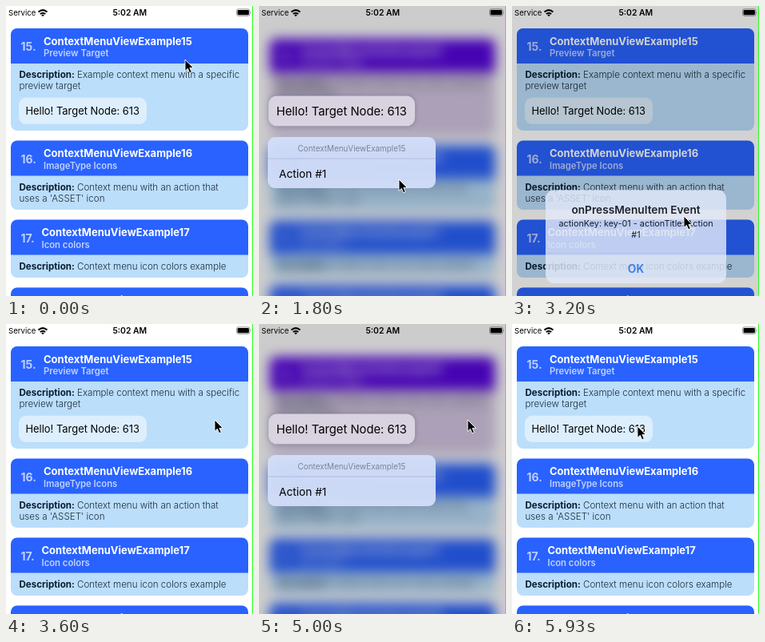
Animation, 309 px wide and 363 px high, one loop 6.07 s. Source, as an HTML page:

```html
<!DOCTYPE html>
<html lang="en">
<head>
<meta charset="utf-8">
<title>Context menu preview</title>
<style>
  html, body { margin: 0; width: 100%; height: 100%; overflow: hidden; background: #fff; }
  svg { display: block; width: 309px; height: 363px; font-family: Inter, "Open Sans", sans-serif; }
  #list { transform-origin: 154.5px 290px; }
  #shadow { filter: blur(3px); }
  .num { font-size: 14px; font-weight: 700; fill: #fff; opacity: .7; }
  .title { font-size: 13px; font-weight: 700; fill: #fff; }
  .sub { font-size: 11.3px; font-weight: 600; fill: #fff; opacity: .7; }
  .desc { font-size: 11.58px; font-weight: 300; fill: #1c2b3a; }
  .desc tspan { font-weight: 700; fill: #0b1d30; }
  .mid { text-anchor: middle; }
</style>
</head>
<body>
<svg viewBox="0 0 309 363">
  <g id="list"></g>
  <rect id="menuDim" width="309" height="363"/>

  <g id="menu">
    <rect x="-105" y="-32" width="210" height="64" rx="9" fill="#d3dff9" fill-opacity=".95"/>
    <path d="M-105-5H105" stroke="#8f9db8" stroke-opacity=".6" stroke-width=".7"/>
    <text class="mid" y="-14" font-size="9.9" fill="#7c8494">ContextMenuViewExample15</text>
    <text x="-91" y="19" font-size="13.7">Action #1</text>
  </g>

  <g id="preview">
    <rect id="shadow" x="-80" y="-16.5" width="160" height="33" rx="9" fill="#345"/>
    <rect id="label" x="-80" y="-16.5" width="160" height="33" rx="9"/>
    <text x="-71.5" y="4.7" font-size="12.92">Hello! Target Node: 613</text>
  </g>

  <text x="3" y="12" font-size="9.6">Service</text>
  <g fill="none" stroke="#000" stroke-width="2">
    <path d="M40.5 7.4q5.5-4.6 11 0M42.8 10q3.2-2.6 6.4 0"/>
    <path d="M46 13.2l-1.8-1.9q1.8-1.4 3.6 0z" fill="#000" stroke="none"/>
  </g>
  <text class="mid" x="154.8" y="12.3" font-size="10.4" font-weight="600">5:02 AM</text>
  <rect x="288.5" y="3.8" width="16.5" height="8.6" rx="2.4" fill="none" stroke="#000" stroke-opacity=".5" stroke-width=".8"/>
  <rect x="289.6" y="4.9" width="14.3" height="6.4" rx="1.4"/>
  <path d="M305.8 6.7q1.4 1.4 0 2.8z" opacity=".5"/>

  <rect id="alertDim" width="309" height="363"/>
  <g id="alert">
    <rect x="-113" y="-58.5" width="226" height="117" rx="11" fill="#e2eaf8" fill-opacity=".87"/>
    <path d="M-113 21H113" stroke="#8f9db8" stroke-opacity=".3" stroke-width=".7"/>
    <g class="mid" fill="#15181f">
      <text y="-29" font-size="13.7" font-weight="600">onPressMenuItem Event</text>
      <text y="-12.5" font-size="10.85">actionKey: key-01 - actionTitle: Action</text>
      <text y="1" font-size="10.85">#1</text>
      <text y="45" font-size="13.8" font-weight="600" fill="#2f78ee">OK</text>
    </g>
  </g>

  <rect x="308" width="1" height="363" fill="#2cff1e"/>
  <path id="cursor" d="M0 0V15.5L3.6 12.2L6.1 18L8.9 16.8L6.4 11.2H11.2Z" stroke="#fff"/>
</svg>

<script>
const $ = id => document.getElementById(id);
const LOOP = 6070, STEP = 100;

const cards = [
  { n: 15, y: 28, h: 128, x: 47, sub: "Preview Target",
    desc: ["Example context menu with a specific", "preview target"] },
  { n: 16, y: 168.5, h: 86.5, x: 47, sub: "ImageType Icons",
    desc: ["Context menu with an action that", "uses a 'ASSET' icon"] },
  { n: 17, y: 267.5, h: 72.5, x: 44.5, sub: "Icon colors",
    desc: ["Context menu icon colors example", ""] },
  { n: 18, y: 352.5, h: 86, x: 47, sub: "", desc: ["", ""] }
];

$("list").innerHTML = cards.map(c => `<g transform="translate(0 ${c.y})">
  <rect class="body" x="6" width="297" height="${c.h}" rx="8" fill="#bbdefb"/>
  <path class="head" d="M6 44V8a8 8 0 0 1 8-8H295a8 8 0 0 1 8 8V44z" fill="#2962ff"/>
  <text class="num" x="18.5" y="28">${c.n}.</text>
  <text class="title" x="${c.x}" y="20.5">ContextMenuViewExample${c.n}</text>
  <text class="sub" x="${c.x}" y="35">${c.sub}</text>
  <text class="desc" x="16.5" y="62"><tspan>Description:</tspan> ${c.desc[0]}</text>
  <text class="desc" x="16.5" y="76">${c.desc[1]}</text>
</g>`).join("");

const head = document.querySelector(".head"), body = document.querySelector(".body");

const mix = (a, b, k) => a + (b - a) * k;
const mixColor = (a, b, k) => `rgb(${a.map((v, i) => Math.round(mix(v, b[i], k)))})`;
const ramp = (t, a, b) => Math.max(0, Math.min(1, (t - a) / (b - a)));
const show = (t, a, b, c, d) => ramp(t, a, b) - ramp(t, c, d);
const place = (id, x, y, s = 1) => $(id).setAttribute("transform", `translate(${x} ${y}) scale(${s})`);
const fade = (id, v) => $(id).setAttribute("opacity", v);

// Pointer moves: start, end, x, y
const moves = [
  [100, 300, 253, 122],
  [1200, 1600, 175, 217],
  [2600, 2700, 158, 322],
  [2900, 3200, 215, 263],
  [3200, 3600, 261, 120],
  [5200, 5900, 157, 128]
];

function pointer(t) {
  let x = 224, y = 67;
  for (const [a, b, toX, toY] of moves) {
    const k = ramp(t, a, b);
    x = mix(x, toX, k);
    y = mix(y, toY, k);
  }
  return [x, y];
}

function draw(t) {
  const press = show(t, 600, 1000, 2300, 2400) + show(t, 3600, 4400, 5200, 5600);
  const open = show(t, 1000, 1400, 2300, 2400) + show(t, 4900, 5000, 5200, 5600);
  const alert = ramp(t, 2300, 2400) - ramp(t, 3100, 3500) ** 2;
  const settle = ramp(t, 2600, 2700);
  const late = open * open;
  const tint = Math.min(1, open * 4);

  $("list").style.filter = open ? `blur(${8 * open}px)` : "none";
  $("list").style.transform = `scale(${1 - .05 * open})`;
  head.setAttribute("fill", mixColor([41, 98, 255], [88, 4, 224], tint));
  body.setAttribute("fill", mixColor([187, 222, 251], [214, 200, 228], tint));
  fade("menuDim", .2 * late);

  place("menu", mix(111.3, 116, late), mix(164, 196, late), mix(.37, 1, late));
  fade("menu", Math.min(1, open * 2));

  place("preview", 96 + 7.5 * open, 131.3, 1 + .05 * press + .095 * open);
  $("label").setAttribute("fill", mixColor([221, 239, 253], [217, 210, 224], open));
  fade("shadow", .35 * press);

  place("alert", 155, 288.7, mix(1.05, 1, settle));
  fade("alert", alert * mix(.88, 1, settle));
  fade("alertDim", .19 * alert);
  place("cursor", ...pointer(t), .93);
}

const begin = performance.now();
function tick() {
  const t = (performance.now() - begin) % LOOP;
  draw(Math.floor(t / STEP) * STEP);
  requestAnimationFrame(tick);
}
tick();
</script>
</body>
</html>
```
